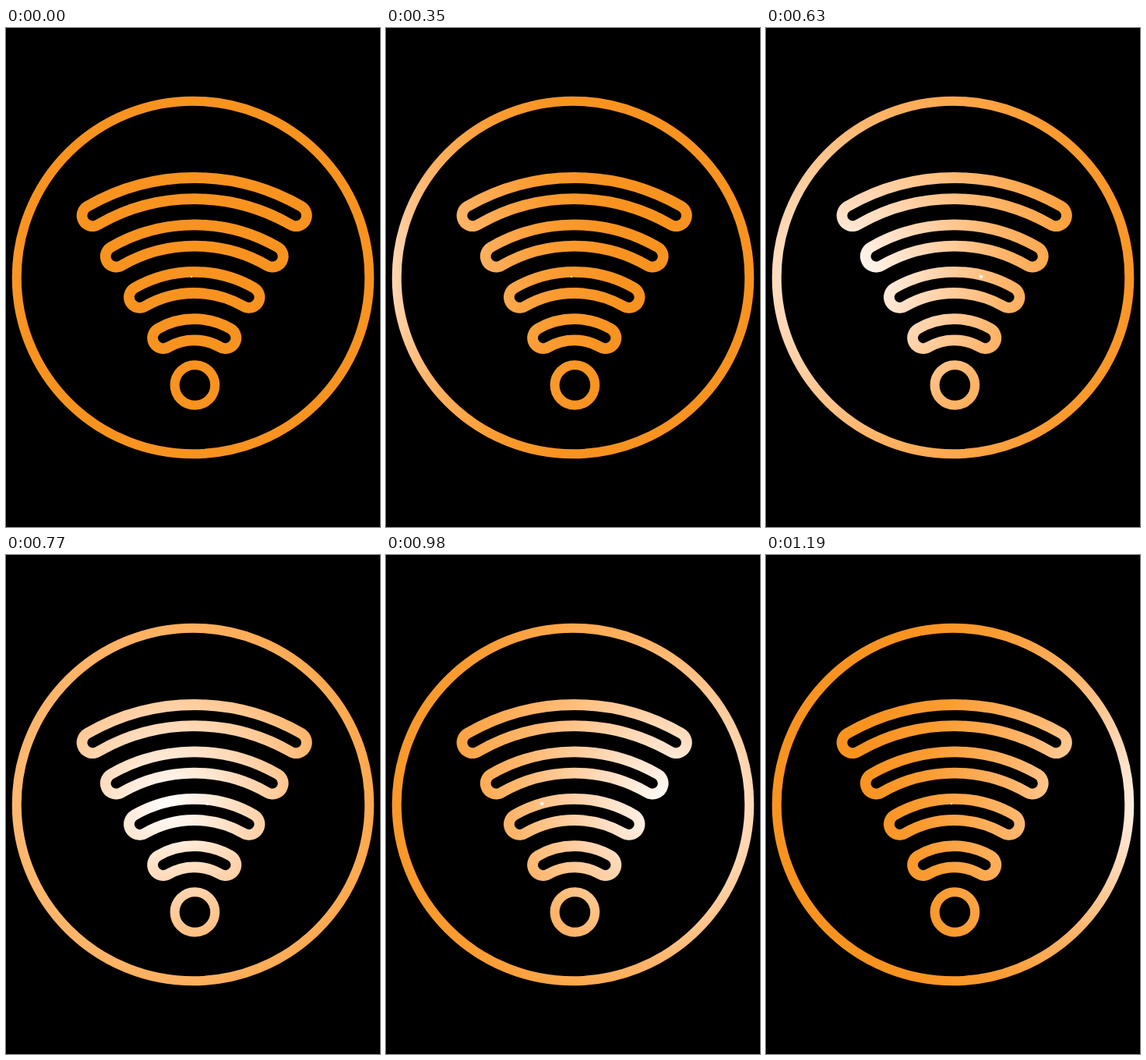
Write an HTML page that moves like this. It is 480 px wide and 640 px high and loops after 1260 ms.

```html
<!DOCTYPE html>
<html lang="en">
<head>
<meta charset="utf-8">
<title>Signal shine</title>
<style>
  html, body { margin: 0; width: 100%; height: 100%; overflow: hidden; background: #000; }
  svg { display: block; width: 100%; height: 100%; fill: none; stroke-linecap: round; }
</style>
</head>
<body>
<svg viewBox="0 0 480 640">
  <defs>
    <radialGradient id="shine" gradientUnits="userSpaceOnUse" cx="-361" cy="320" r="400">
      <stop offset="0" stop-color="#fff"/>
      <stop offset=".25" stop-color="#ffd9b8"/>
      <stop offset=".5" stop-color="#ffb66c"/>
      <stop offset=".8" stop-color="#fb9b30"/>
      <stop offset="1" stop-color="#f99320"/>
    </radialGradient>
  </defs>
  <g stroke="url(#shine)" stroke-width="12">
    <circle cx="240" cy="320" r="226.3"/>
    <circle cx="242.4" cy="458" r="25.8"/>
    <g id="bands" stroke-width="41"></g>
  </g>
  <g id="holes" stroke="#000" stroke-width="13.4"></g>
  <circle id="spark" cy="319" fill="#fff"/>
</svg>
<script>
const LOOP = 1260, STEP = 70;
const $ = id => document.getElementById(id);
const glow = $('shine'), spark = $('spark');

// Four concentric 60-degree arcs, each a wide band with a narrow hole
let arcs = '';
for (let i = 0; i < 4; i++) {
  const r = 80 + 60.4 * i, y = 466.8 - r * Math.cos(Math.PI / 6);
  arcs += `<path d="M${241.7 - r / 2} ${y}a${r} ${r} 0 0 1 ${r} 0"/>`;
}
$('bands').innerHTML = $('holes').innerHTML = arcs;

function draw(now) {
  const t = Math.floor(now % LOOP / STEP) * STEP;
  glow.setAttribute('cx', -361 + 0.74 * t);

  // The spark swings right, then left, as the glow crosses the middle
  const u = (t - 805) / 175;
  const swing = -103 * u * Math.exp(-(u ** 4));
  spark.setAttribute('cx', 238 + swing);
  spark.setAttribute('r', 1.1 + 0.03 * Math.abs(swing));
}

let start;
function tick(now) {
  start ??= now;
  draw(now - start);
  requestAnimationFrame(tick);
}
draw(0);
requestAnimationFrame(tick);
</script>
</body>
</html>
```
